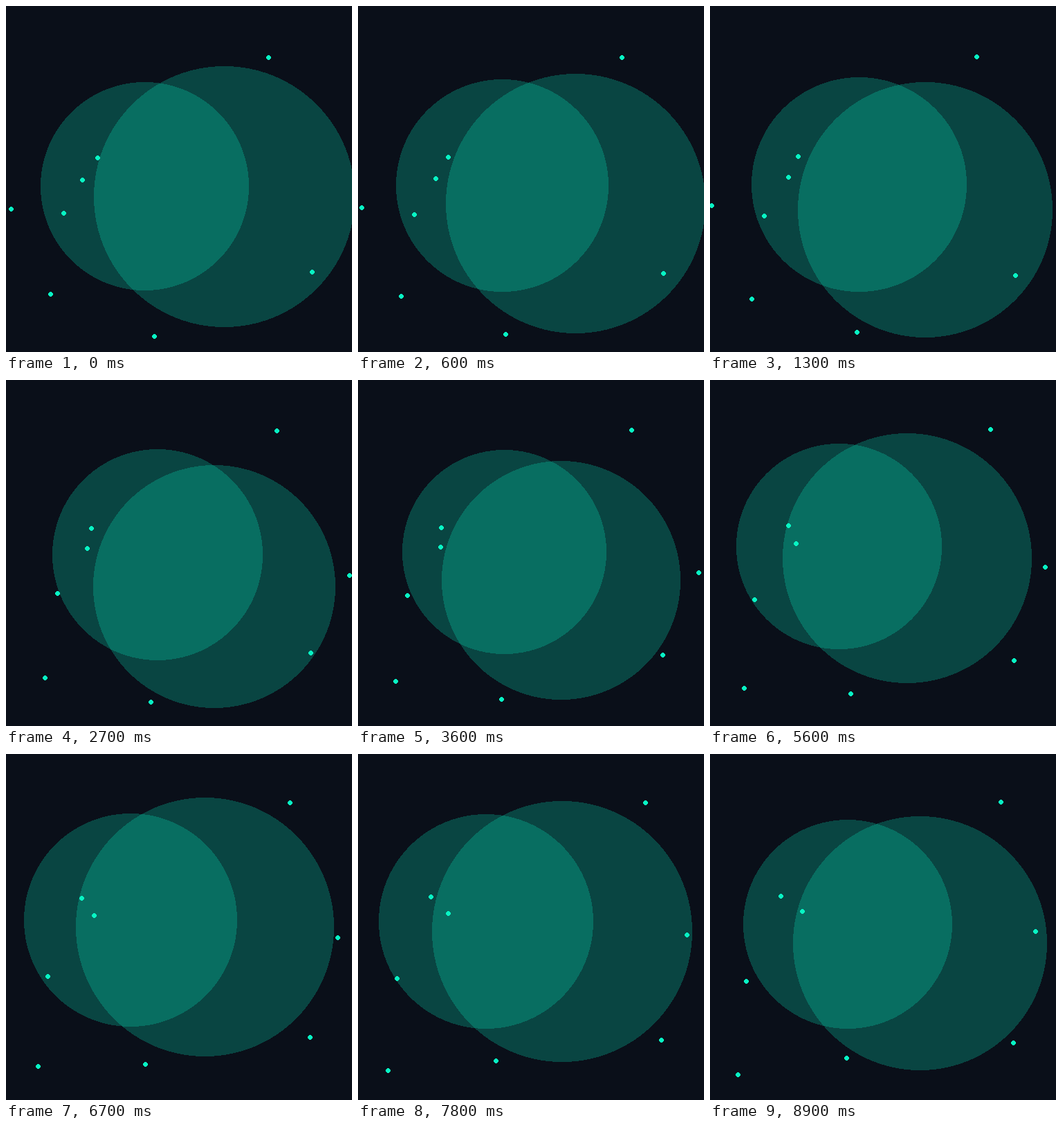
Recreate the animation shown at these times as an HTML page with a canvas. Size 500 by 500 pixels, loop 9 s.

```html
<!DOCTYPE html>
<html lang="en">
<head>
<meta charset="utf-8">
<title>Drifting circles</title>
<style>
  html, body { margin: 0; width: 100%; height: 100%; overflow: hidden; background: #0a0f19; }
  canvas { display: block; width: 100vw; height: 100vh; }
</style>
</head>
<body>
<canvas id="stage" width="500" height="500"></canvas>
<script>
const SIZE = 500, LOOP = 9000, STEP = 100, MIDDLE = LOOP / STEP / 2;
const BACK = '#0a0f19', VEIL = 'rgba(5, 231, 189, 0.25)', SPARK = '#08f5c3';
const ctx = document.getElementById('stage').getContext('2d');
const { sin, cos, floor, round, sqrt, PI } = Math;

// Where the dots are halfway through the loop, grouped by direction
const fans = [
  [[440, 401], [52, 440], [68, 314]],
  [[117, 212], [489, 275], [206, 458]],
  [[122, 239], [400, 72]]
];

// Each fan spreads its headings evenly over 40 degrees
const dots = fans.flatMap((fan, g) => fan.map(([x, y], i) => {
  const u = i / (fan.length - 1);
  const heading = (97 + 108 * g + 40 * u) * PI / 180;
  const speed = 0.37 + 0.1 * u + 0.17 * sin(PI * u);
  return { x, y, vx: speed * cos(heading), vy: speed * sin(heading) };
}));

const wrap = v => ((v % SIZE) + SIZE) % SIZE;

// Hard-edged disc snapped to whole pixels
function disc(x, y, r, color) {
  const left = floor(x - r), right = floor(x + r) + 1;
  const top = floor(y - r), bottom = floor(y + r) + 1;
  const cx = (left + right) / 2, cy = (top + bottom) / 2;
  const rx = (right - left) / 2, ry = (bottom - top) / 2;
  ctx.fillStyle = color;
  ctx.beginPath();
  for (let row = top; row < bottom; row++) {
    const half = rx * sqrt(1 - ((row + 0.5 - cy) / ry) ** 2);
    const start = round(cx - half);
    ctx.rect(start, row, round(cx + half) - start, 1);
  }
  ctx.fill();
}

function draw(step) {
  const a = 2 * PI * step * STEP / LOOP;
  ctx.fillStyle = BACK;
  ctx.fillRect(0, 0, SIZE, SIZE);
  disc(200 + 20 * sin(a), 250 + 10 * cos(0.7 * a), 150 + 5 * sin(1.5 * a), VEIL);
  disc(300 + 15 * cos(0.8 * a), 275 + 25 * sin(a), 180 + 8 * cos(1.2 * a), VEIL);
  for (const { x, y, vx, vy } of dots) {
    const n = step - MIDDLE;
    disc(wrap(x + vx * n), wrap(y + vy * n), 3, SPARK);
  }
}

const begin = performance.now();
function tick() {
  draw(floor(((performance.now() - begin) % LOOP) / STEP));
  requestAnimationFrame(tick);
}
tick();
</script>
</body>
</html>
```
